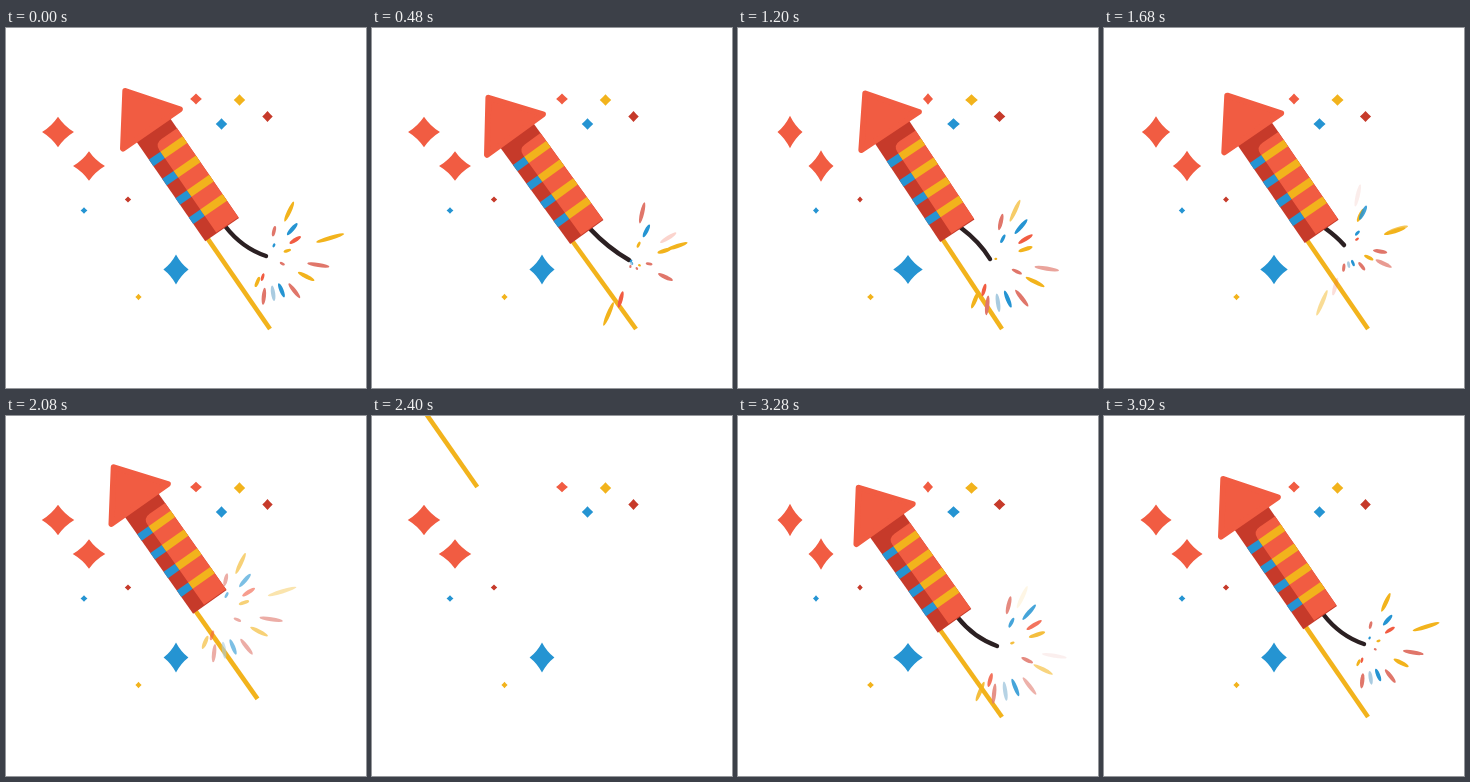
Write an HTML page with a canvas that moves like this. It is 360 px wide and 360 px high and loops after 4 s.

```html
<!DOCTYPE html>
<html lang="en">
<head>
<meta charset="utf-8">
<title>Firework rocket</title>
<style>
html, body { margin: 0; width: 100%; height: 100%; overflow: hidden; background: #fff; }
canvas { display: block; width: 100vw; height: 100vh; }
</style>
</head>
<body>
<canvas id="stage"></canvas>
<script>
const SIZE = 360, LOOP = 4000, STEP = 80, TAU = Math.PI * 2;
const canvas = document.getElementById('stage');
const ctx = canvas.getContext('2d');
const ratio = Math.max(1, window.devicePixelRatio || 1);
canvas.width = canvas.height = SIZE * ratio;

const COLORS = { red: '#f15c42', dark: '#c63a2a', yellow: '#f2b31c', blue: '#2594d2', pink: '#e0766a', tan: '#f0d49a', pale: '#a9cbe0' };
// Muted tones while the rocket is out of sight
const MUTED = { red: '#f7543a', dark: '#b2483a', yellow: '#f75a40', blue: '#868686' };

// x, y, width, height, pulse, color
const DIAMONDS = [
  [52, 104, 29, 31.5, 4, 'red'], [83, 138, 29, 30.5, 4, 'red'],
  [170, 241.5, 27, 29.5, -2.5, 'blue'],
  [190, 71, 11, 11, 1, 'red'], [233.5, 72, 12, 11.5, -.7, 'yellow'],
  [215.5, 96, 12, 11.5, -.7, 'blue'], [261.5, 88.5, 11, 11, -.7, 'dark'],
  [78, 182.5, 6.5, 6.5, .5, 'blue'], [122, 171.5, 6, 6, .5, 'dark'],
  [132.5, 269, 6.5, 6.5, -.3, 'yellow']
];

// angle, reach, phase, color
const SPARKS = [
  [-65, 55, .7, 'yellow'], [-17, 67, .83, 'yellow'], [9, 56, .7, 'pink'], [27, 50, .62, 'yellow'],
  [52, 50, .62, 'pink'], [68, 45, .55, 'blue'], [82, 46, .55, 'pale'], [96, 48, .58, 'pink'],
  [105, 42, .29, 'red'], [-77, 52, .3, 'pink'], [-49, 48, .52, 'blue'], [-32, 44, .48, 'red'],
  [-18, 54, .21, 'yellow'], [25, 42, .21, 'pink'], [-63, 38, .19, 'blue'], [113, 62, .25, 'yellow']
];

// Pose: time, rotation in degrees, length scale
const POSE = [[0, 0, 1], [480, -1.3, .985], [1200, 1.1, .978], [2080, -.6, .979],
  [2800, 0, 1], [3160, 0, .97], [3280, -.8, .971], [3920, 0, 1], [4000, 0, 1]];
// Fuse: time, bend x, y, burning end x, y
const FUSE = [[0, 236, 220, 260, 228], [480, 236, 220, 257, 232], [1200, 242, 214, 252, 231],
  [1700, 233, 209, 240, 217], [2000, 222, 201, 223, 204], [2080, 222, 201, 223, 212],
  [2800, 236, 221, 259, 231], [3280, 236, 222, 259, 230], [3920, 236, 220, 260, 228], [4000, 236, 220, 260, 228]];
const GLOW = [[0, 1], [1680, 1], [2080, .6], [2200, 0], [3080, 0], [3240, .85], [3920, 1], [4000, 1]];

function at(t, rows) {
  const i = Math.max(1, rows.findIndex(r => r[0] >= t));
  const a = rows[i - 1], b = rows[i];
  const p = (t - a[0]) / (b[0] - a[0]);
  const e = p * p * (3 - 2 * p);
  return a.slice(1).map((v, k) => v + (b[k + 1] - v) * e);
}

// Travel along the rocket's axis, positive toward the lower right
function travel(t) {
  if (t < 1840) return 0;
  if (t < 2800) return -22 * ((t - 1840) / 240) ** 3;
  return 390 * Math.max(0, 1 - (t - 2880) / 320) ** 2;
}

function diamond(x, y, w, h, color) {
  const a = w / 2, b = h / 2, k = w > 20 ? .39 : .47;
  ctx.beginPath();
  ctx.moveTo(x, y - b);
  ctx.quadraticCurveTo(x + a * k, y - b * k, x + a, y);
  ctx.quadraticCurveTo(x + a * k, y + b * k, x, y + b);
  ctx.quadraticCurveTo(x - a * k, y + b * k, x - a, y);
  ctx.quadraticCurveTo(x - a * k, y - b * k, x, y - b);
  ctx.fillStyle = color;
  ctx.fill();
}

function box(x, y, w, h, color) {
  ctx.fillStyle = color;
  ctx.fillRect(x, y, w, h);
}

function drawDiamonds(t) {
  const wave = Math.cos(TAU * (t / 2000 - .12));
  const tones = t >= 2480 && t < 2960 ? MUTED : COLORS;
  for (const [x, y, w, h, pulse, color] of DIAMONDS)
    diamond(x, y, w + pulse * wave, h - pulse * wave * .3, tones[color]);
}

function drawRocket() {
  box(1.2, -6, 4.6, 115, COLORS.yellow);
  box(0, -124, 41, 124, COLORS.dark);

  ctx.beginPath();
  ctx.moveTo(41, -1);
  ctx.lineTo(14, -1);
  ctx.lineTo(14, -101);
  ctx.quadraticCurveTo(14, -109, 22, -109);
  ctx.lineTo(41, -109);
  ctx.fillStyle = COLORS.red;
  ctx.fill();

  for (let i = 0; i < 4; i++) {
    const y = -29 - i * 23.4;
    box(0, y, 14, 8, COLORS.blue);
    box(14, y, 27, 8, COLORS.yellow);
  }

  // Nose with rounded corners
  ctx.beginPath();
  ctx.moveTo(19.5, -169);
  ctx.lineTo(54, -123);
  ctx.lineTo(-15, -123);
  ctx.closePath();
  ctx.lineJoin = 'round';
  ctx.lineWidth = 6;
  ctx.fillStyle = ctx.strokeStyle = COLORS.red;
  ctx.fill();
  ctx.stroke();
}

function drawSparks(t, x, y, glow) {
  for (const [angle, reach, phase, color] of SPARKS) {
    const p = (t / 1000 + phase) % 1;
    const r = reach * (1 - (1 - p) ** 2);
    const len = Math.max(3, r * .48 - 2);
    ctx.save();
    ctx.globalAlpha = glow * Math.min(1, (1 - p) / .15);
    ctx.translate(x, y);
    ctx.rotate(angle * TAU / 360);
    ctx.beginPath();
    ctx.ellipse(r, 0, len / 2, Math.min(2.1, .9 + len * .08), 0, 0, TAU);
    ctx.fillStyle = COLORS[color];
    ctx.fill();
    ctx.restore();
  }
}

function draw(t) {
  ctx.setTransform(ratio, 0, 0, ratio, 0, 0);
  ctx.fillStyle = '#fff';
  ctx.fillRect(0, 0, SIZE, SIZE);
  drawDiamonds(t);
  if (t >= 2480 && t < 2960) return;

  const s = travel(t), dx = s * .568, dy = s * .823;
  const [turn, stretch] = at(t, POSE);
  const [bx, by, ex, ey] = at(t, FUSE);
  const tilt = (turn - 34.6) * TAU / 360;

  if (t < 2000 || t > 2800) {
    // Fuse root sits on the base of the body
    const u = 21.5, v = -110 * stretch;
    const c = Math.cos(tilt), n = Math.sin(tilt);
    ctx.beginPath();
    ctx.moveTo(264 + dx + u * c - v * n, 301 + dy + u * n + v * c);
    ctx.quadraticCurveTo(bx + dx, by + dy, ex + dx, ey + dy);
    ctx.lineCap = 'round';
    ctx.lineWidth = 4.4;
    ctx.strokeStyle = '#2b2022';
    ctx.stroke();
  }

  ctx.save();
  ctx.translate(264 + dx, 301 + dy);
  ctx.rotate(tilt);
  ctx.scale(1, stretch);
  ctx.translate(-3.5, -109);
  drawRocket();
  ctx.restore();

  const [glow] = at(t, GLOW);
  if (glow > 0) drawSparks(t, ex + dx + 2, ey + dy + 1, glow);
}

const start = performance.now();
function tick() {
  const t = (performance.now() - start) % LOOP;
  draw(Math.floor(t / STEP) * STEP);
  requestAnimationFrame(tick);
}
tick();
</script>
</body>
</html>
```
